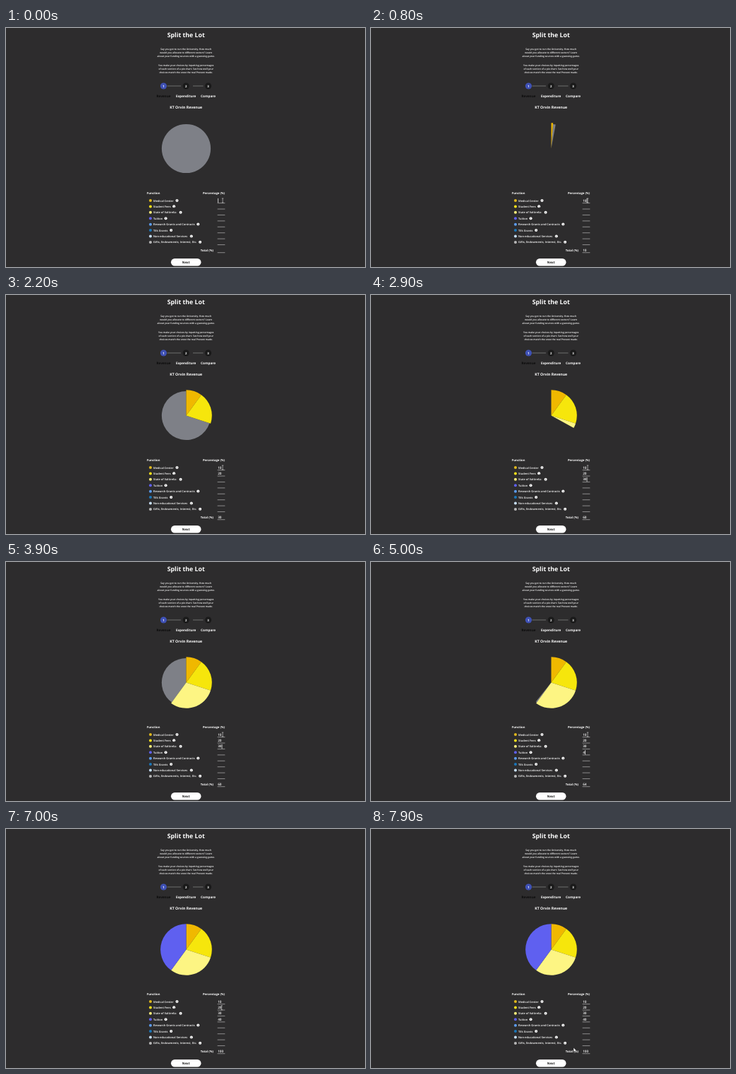
An HTML page that plays this animation: 507x338 px, repeating every 8000 ms.

```html
<!DOCTYPE html>
<html lang="en">
<head>
<meta charset="utf-8">
<title>Split the Lot</title>
<style>
  html, body { margin: 0; width: 100%; height: 100%; overflow: hidden; background: #2d2c2d; }
  svg { display: block; width: 507px; height: 338px; }
  text { font-family: "Open Sans", "Noto Sans", sans-serif; font-weight: 600; fill: #fff; text-rendering: geometricPrecision; }
  .bold { font-weight: 700; }
  .mid { text-anchor: middle; }
</style>
</head>
<body>
<svg id="stage" viewBox="0 0 507 338"></svg>
<script>
const NS = 'http://www.w3.org/2000/svg';
const stage = document.getElementById('stage');

function add(tag, attrs, content) {
  const el = document.createElementNS(NS, tag);
  for (const k in attrs) el.setAttribute(k, attrs[k]);
  if (content !== undefined) el.textContent = content;
  stage.appendChild(el);
  return el;
}
const label = (x, y, size, str, cls = '', fill = '#fff') =>
  add('text', { x, y, 'font-size': size, class: cls, style: `fill:${fill}` }, str);
const line = (x1, x2, y, stroke, width) =>
  add('path', { d: `M${x1} ${y}H${x2}`, stroke, 'stroke-width': width });

// Heading and introduction
const MID = 254.2;
label(MID, 13, 8.77, 'Split the Lot', 'bold mid');
[
  [31.1, 'Say you got to run the University. How much'],
  [36.3, 'would you allocate to different sectors? Learn'],
  [41.4, 'about your funding sources with a guessing game.'],
  [53.5, 'You make your choices by inputting percentages'],
  [58.7, 'of each section of a pie chart. See how well your'],
  [63.9, 'choices match the ones the real Provost made.']
].forEach(([y, str]) => label(MID, y, 3.36, str, 'mid'));

// Stepper
line(227.5, 247, 82, '#8a8a8a', 0.7);
line(264, 278.5, 82, '#8a8a8a', 0.7);
[
  [222.5, 'Revenue', '#3f51b5', '#0c0c0c'],
  [254.2, 'Expenditure', '#1a1a1a', '#fff'],
  [285.6, 'Compare', '#1a1a1a', '#fff']
].forEach(([x, name, disc, ink], i) => {
  add('circle', { cx: x, cy: 82, r: 4.6, fill: disc });
  label(x, 83.6, 4.4, i + 1, 'bold mid');
  label(x, 97.6, 4.68, name, 'bold mid', ink);
});
label(MID, 114, 5.2, 'KT Orvin Revenue', 'bold mid');

// Pie: four slices and the unassigned rest
const CX = 254.5, CY = 170.5, R = 36.3, REST_R = 34.6;
const rest = add('path', { fill: '#7e8087' });
const slices = ['#f0b800', '#f6e60c', '#fdf583', '#5f60f0'].map(fill => add('path', { fill }));

function sector(from, to, r) {
  const sweep = Math.min(to - from, 99.999);
  if (sweep <= 0.01) return '';
  const at = v => {
    const a = v / 50 * Math.PI;
    return `${(CX + r * Math.sin(a)).toFixed(3)} ${(CY - r * Math.cos(a)).toFixed(3)}`;
  };
  return `M${CX} ${CY}L${at(from)}A${r} ${r} 0 ${sweep > 50 ? 1 : 0} 1 ${at(from + sweep)}Z`;
}

// Table
const rowY = i => 244 + 8.42 * i;
const VALUE_X = 299.2, VALUE_SIZE = 4.7, TOTAL_Y = 314.3;
label(199, 235.2, 4.2, 'Function', 'bold');
label(278, 235.2, 4.16, 'Percentage (%)', 'bold');
const values = [
  ['Medical Center', 241.5, '#e0b81c'],
  ['Student Fees', 237.2, '#f5e01a'],
  ['State of Valtirelia', 246.6, '#fbf07c'],
  ['Tuition', 225.6, '#5f60f0'],
  ['Research Grants and Contracts', 271.3, '#5c9cee'],
  ['Tilk Grants', 233.2, '#1b76b8'],
  ['Non-educational Services', 261.8, '#c8e0f8'],
  ['Gifts, Endowments, Interest, Etc.', 274.1, '#b8b8b8']
].map(([name, infoX, color], i) => {
  const y = rowY(i);
  add('circle', { cx: 204, cy: y, r: 2, fill: color });
  label(208, y + 1.5, 3.95, name);
  add('circle', { cx: infoX, cy: y - 0.1, r: 2, fill: '#fff' });
  label(infoX, y + 1.1, 3.2, 'i', 'bold mid', '#2d2c2d');
  line(298.6, 309.3, y + 3.6, '#b4b4b4', 0.7);
  return label(VALUE_X, y + 1.5, VALUE_SIZE, '');
});
label(274.8, TOTAL_Y + 1.6, 4.22, 'Total (%)', 'bold');
line(298.6, 309.3, TOTAL_Y + 3.4, '#b4b4b4', 0.7);
const total = label(VALUE_X, TOTAL_Y + 1.6, VALUE_SIZE, '');

add('rect', { x: 233, y: 326, width: 42.5, height: 10.4, rx: 5.2, fill: '#fff' });
label(MID, 332.8, 4.5, 'Next', 'bold mid', '#222');

const caret = add('rect', { width: 0.7, height: 6.2, fill: '#fff' });
const beam = add('path', {
  d: 'M-1.2 -3H1.2M0 -3V3M-1.2 3H1.2', fill: 'none', stroke: '#d8d8d8', 'stroke-width': 0.6
});
const arrow = add('path', {
  d: 'M0 0V6.2L1.5 4.9L2.5 7.2L3.5 6.8L2.5 4.5H4.4Z', fill: '#fff', stroke: '#111', 'stroke-width': 0.4
});

// Time, row, text in that row; empty text means the field took focus
const LOOP = 8000, GROW = 600, BLINK = 500;
const keys = [
  [-100, 0, ''], [600, 0, '1'], [700, 0, '10'],
  [1200, 1, ''], [1500, 1, '2'], [1600, 1, '20'],
  [1700, 2, ''], [2600, 2, '3'], [2870, 2, '30'],
  [4100, 3, ''], [4900, 3, '4'], [5100, 3, '40']
];
// Time, x, y of the pointer
const pointer = [
  [0, 306, 244], [6350, 306, 244], [6400, 307, 243.6], [6550, 307, 243.6], [6700, 306.3, 243.4],
  [6850, 306.3, 243.4], [7150, 303, 262], [7450, 295, 292], [7700, 287.2, 308], [7900, 286, 309.2], [8000, 286, 309.2]
];

const ease = p => p < 0.5 ? 4 * p ** 3 : 1 - (2 - 2 * p) ** 3 / 2;

function pointerAt(t) {
  const i = pointer.findIndex(p => p[0] > t);
  const [t0, x0, y0] = pointer[i - 1], [t1, x1, y1] = pointer[i];
  const p = (t - t0) / (t1 - t0);
  return [x0 + (x1 - x0) * p, y0 + (y1 - y0) * p];
}

function render(t) {
  const typed = ['', '', '', ''];
  let focus, last = null, before = 0;
  for (const key of keys) {
    const [time, row, str] = key;
    if (time > t) break;
    focus = key;
    if (str) {
      last = key;
      before = +typed[row];
    }
    typed[row] = str;
  }

  const sum = typed.reduce((s, v) => s + +v, 0);
  const p = last ? ease(Math.min(1, (t - last[0]) / GROW)) : 1;
  let angle = 0;
  typed.forEach((str, i) => {
    let share = +str;
    if (last && i === last[1]) share = before + (share - before) * p;
    slices[i].setAttribute('d', sector(angle, angle + share, R));
    angle += share;
    values[i].textContent = str;
  });
  rest.setAttribute('d', sector(angle, angle + (100 - sum) * p, REST_R));
  total.textContent = sum || '';

  const [time, row, str] = focus;
  caret.setAttribute('x', VALUE_X + 0.1 + 2.68 * str.length);
  caret.setAttribute('y', rowY(row) - 3.1);
  caret.setAttribute('opacity', Math.floor((t - time) / BLINK) % 2 ? 0 : 1);

  const [x, y] = pointerAt(t);
  const overField = x > 298.5;
  beam.setAttribute('opacity', overField ? 1 : 0);
  arrow.setAttribute('opacity', overField ? 0 : 1);
  for (const el of [beam, arrow]) el.setAttribute('transform', `translate(${x} ${y})`);
}

const start = performance.now();
function tick() {
  render((performance.now() - start) % LOOP);
  requestAnimationFrame(tick);
}
tick();
</script>
</body>
</html>
```
